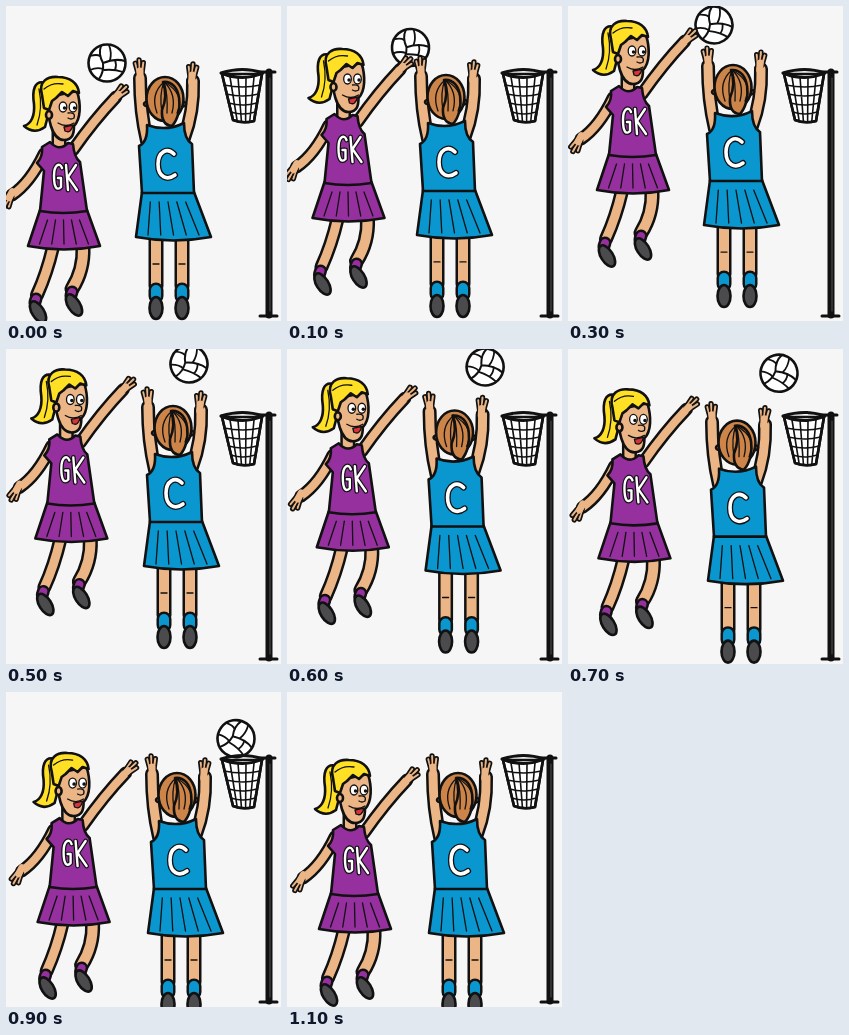
Recreate the animation shown at these times as an HTML page. Size 275 px wide and 315 px high, loop 1300 ms.

```html
<!DOCTYPE html>
<html lang="en">
<head>
<meta charset="utf-8">
<title>Netball shot</title>
<style>
html, body { margin: 0; width: 100%; height: 100%; overflow: hidden; background: #f6f6f6; }
svg { display: block; width: 275px; height: 315px; }
path, ellipse { stroke: #111; stroke-width: 2.6; stroke-linejoin: round; stroke-linecap: round; }
</style>
</head>
<body>
<svg id="stage" viewBox="0 0 275 315" xmlns="http://www.w3.org/2000/svg"></svg>
<script>
const STEP = 100, LOOP = 1300, FRAMES = 12;
const INK = "#111", SKIN = "#ecb586", PURPLE = "#96309f", BLUE = "#0a97cf";
const YELLOW = "#ffe024", BROWN = "#cc8448", SHOE = "#4b4a4d", WHITE = "#fff";

function make(tag, parent, attrs = {}) {
  const node = document.createElementNS("http://www.w3.org/2000/svg", tag);
  for (const key in attrs) node.setAttribute(key, attrs[key]);
  return parent.appendChild(node);
}
const shape = (parent, fill, d) => make("path", parent, { d, fill });
const line = (parent, d, width = 1.3, color = INK) =>
  make("path", parent, { d, fill: "none", style: `stroke:${color};stroke-width:${width}` });
const oval = (parent, fill, cx, cy, rx, ry, turn = 0) =>
  make("ellipse", parent, { cx, cy, rx, ry, fill, transform: `rotate(${turn} ${cx} ${cy})` });
const place = (node, x, y, turn = 0) =>
  node.setAttribute("transform", `translate(${x} ${y}) rotate(${turn})`);

// A coloured stroke with an ink border: limbs, socks and lettering.
function limb(parent, color, width, d, border = 5) {
  line(parent, d, width + border);
  line(parent, d, width, color);
}
function hand(parent, x, y, turn) {
  const group = make("g", parent);
  place(group, x, y, turn);
  for (let i = -1; i <= 1; i++) limb(group, SKIN, 2, `M${i * 2} 0L${i * 4} ${Math.abs(i) * 3 - 13}`, 3.4);
  line(group, "M0 -2V5", 7, SKIN);
}
function skirt(parent, color, [left, right, top], [hemLeft, hemRight, hem]) {
  const mix = (a, b, u) => a + (b - a) * u;
  shape(parent, color, `M${left} ${top}H${right}L${hemRight} ${hem}Q${mix(hemLeft, hemRight, .5)} ${hem + 7} ${hemLeft} ${hem}Z`);
  for (let u = .16; u < 1; u += .17) {
    line(parent, `M${mix(left, right, u)} ${top + 10}L${mix(hemLeft, hemRight, u)} ${hem - 2}`);
  }
}

function drawPost(parent) {
  line(parent, "M254 66H269", 3);
  line(parent, "M263 66V309", 7);
  line(parent, "M264 72V305", 1.2, "#4a4a4a");
  line(parent, "M254 310H271", 3);
  shape(parent, WHITE, "M216 68L227 114Q237 118 248 115L256 68Z");
}
function drawNet(parent) {
  for (let i = 1; i < 5; i++) {
    const y = 70 + i * 9;
    line(parent, `M${216 + i * 8} 71L${227 + i * 4.2} 115M${216 + i * 2.2} ${y}Q237 ${y + 4} ${256 - i * 1.7} ${y}`, 1.6);
  }
  line(parent, "M216 68L227 114Q237 118 248 115L256 68", 2.6);
  line(parent, "M215 67Q237 60 257 67Q237 76 215 67", 3);
}
function drawBall(parent) {
  oval(parent, WHITE, 0, 0, 18.5, 18.5);
  line(parent, "M-4 0Q-9 -9 -6 -17M-4 0Q8 -5 18 -2M-4 0Q-3 9 -8 16", 2);
  line(parent, "M-17 -7Q-10 -9 -7 -7M-17 7Q-10 4 -4 6M3 -3Q5 -10 2 -18M-3 7Q7 6 16 9M8 -3Q10 2 8 7", 1.8);
}
function drawShooter(parent) {
  for (const x of [162, 188]) {
    limb(parent, SKIN, 10, `M${x} 242V290`);
    limb(parent, BLUE, 10, `M${x} 294V300`);
    oval(parent, SHOE, x, 312, 6.5, 11);
    line(parent, `M${x - 3} 268H${x + 3}`);
  }
  limb(parent, SKIN, 9, "M146 82Q146 116 153 145");
  limb(parent, SKIN, 9, "M199 85Q200 116 190 142");
  hand(parent, 146, 77, -4);
  hand(parent, 198, 81, 4);
  skirt(parent, BLUE, [148, 200, 196], [142, 217, 241]);
  shape(parent, BLUE, "M153 129Q172 136 190 127Q190 143 198 148L200 197H148L145 150Q154 146 153 129Z");
  oval(parent, SKIN, 171, 108, 21, 5);
  oval(parent, BROWN, 171, 103, 18.5, 22);
  shape(parent, BROWN, "M169 86C188 84 190 117 178 130Q167 129 168 114Q174 100 169 86Z");
  for (let i = -2; i <= 2; i++) line(parent, `M170 86Q${174 + i * 9} 98 ${173 + i * 5} 117`);
  limb(parent, WHITE, 3.6, "M180 158C173 151 164 156 164 168C164 181 173 185 181 179", 2.6);
}
function drawKeeper(parent) {
  limb(parent, SKIN, 9, "M57 238Q51 264 41 286");
  limb(parent, SKIN, 10, "M87 238Q88 261 76 280");
  for (const [x, y] of [[40, 290], [76, 283]]) {
    limb(parent, PURPLE, 8, `M${x} ${y}l-1 3`);
    oval(parent, SHOE, x + 2, y + 13, 6, 12, -32);
  }
  limb(parent, SKIN, 8, "M48 145Q34 174 16 186");
  limb(parent, SKIN, 8, "M120 88Q98 111 77 141");
  hand(parent, 14, 187, 208);
  hand(parent, 121, 87, 45);
  limb(parent, SKIN, 10, "M63 122V138");
  skirt(parent, PURPLE, [44, 91, 201], [32, 104, 237]);
  shape(parent, PURPLE, "M46 138L54 133Q63 143 72 134L77 135Q78 148 84 153L91 202Q67 206 44 202L48 162L41 154Q47 148 46 138Z");
  limb(parent, WHITE, 2.4, "M66 159C64 153 58 155 58 167C58 179 61 182 65 178V169H62M70 156L72 181M80 156L72 168L81 181", 2.4);

  shape(parent, YELLOW, "M50 74C38 70 36 82 38 95C39 107 35 115 28 117Q38 126 49 118L54 99Z");
  shape(parent, SKIN, "M53 88C50 108 56 131 68 131C77 131 78 124 78 117C85 110 85 95 81 82Z");
  oval(parent, SKIN, 53, 106, 3, 4);
  shape(parent, YELLOW, "M46 86C42 72 52 67 62 68C74 68 82 74 83 84L77 82L72 87L66 83L60 89L56 92L53 101L48 99Z");
  line(parent, "M48 80Q56 73 67 75M43 80Q47 99 41 116");
  for (const x of [67, 77]) {
    oval(parent, WHITE, x, 98, 3.8, 5).style.strokeWidth = 1.3;
    line(parent, `M${x + 1.500} 99v.1`, 3.4);
  }
  line(parent, "M72 104Q80 103 78 109Q75 111 72 109M62 114Q70 119 78 114");
  shape(parent, "#d8323a", "M68 118L77 116Q75 125 69 122Z").style.strokeWidth = 1.3;
}

const stage = document.getElementById("stage");
const layer = draw => {
  const group = make("g", stage);
  draw(group);
  return group;
};
const [, ball, , shooter, keeper] = [drawPost, drawBall, drawNet, drawShooter, drawKeeper].map(layer);

const ramp = (k, from, to) => Math.min(1, Math.max(0, (k - from) / (to - from)));
const smooth = (k, from, to) => (1 - Math.cos(Math.PI * ramp(k, from, to))) / 2;

// The ball rises to the shooter, then follows a thrown arc to the hoop.
function ballAt(k) {
  const rise = ramp(k, 0, 2), flight = Math.max(0, (k - 3) / 2);
  return [
    101 + 45 * rise + flight * (41.5 - 4.5 * flight),
    57 - 31 * rise - 7 * ramp(k, 2, 3) + flight * (6.6 * flight - 10.6)
  ];
}

function render(time) {
  const k = Math.min(FRAMES - 1, Math.floor((time % LOOP) / STEP));
  const leap = Math.sin(ramp(k, 0, 3) * Math.PI / 2), landing = smooth(k, 3.5, 10.7);
  place(keeper, -10 + 7 * leap + 3 * landing, 3 - 56 * leap + 53 * landing);
  place(shooter, -12 + 8 * smooth(k, 1, 4) + 4 * smooth(k, 5, 9),
    -10 - 14 * smooth(k, 0, 4) + 24 * smooth(k, 5, 8.5));
  place(ball, ...ballAt(k), 4 * k);
  ball.style.display = k < FRAMES - 1 ? "" : "none";
}

const start = performance.now();
function tick() {
  render(performance.now() - start);
  requestAnimationFrame(tick);
}
tick();
</script>
</body>
</html>
```
